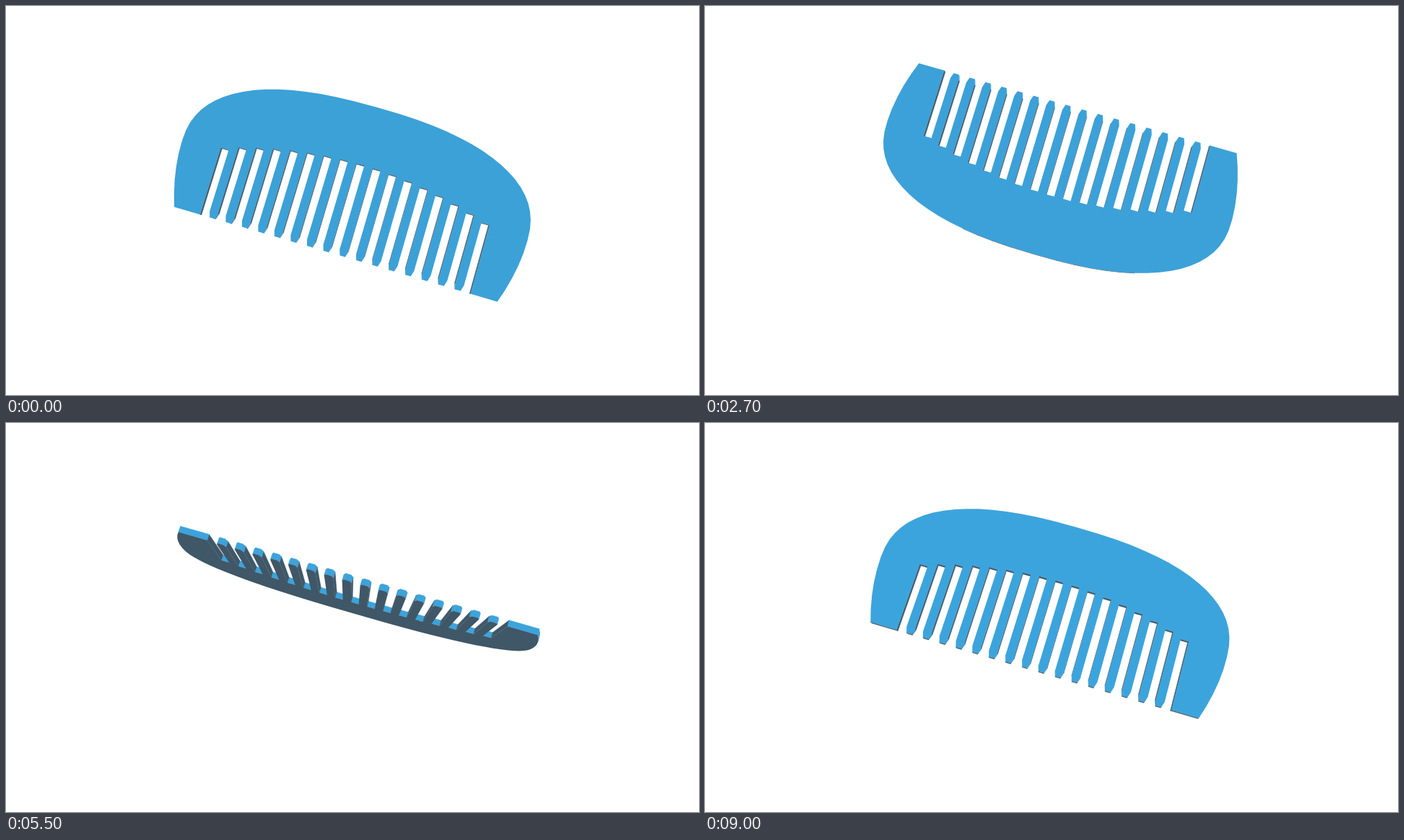
Recreate the animation shown at these times as an HTML page with a canvas. Size 960 px wide and 540 px high, loop 9.1 s.

```html
<!DOCTYPE html>
<html>
<head>
<meta charset="utf-8">
<style>
html, body { margin: 0; width: 100%; height: 100%; overflow: hidden; background: #fff; }
canvas { display: block; }
</style>
</head>
<body>
<canvas id="stage" width="960" height="540"></canvas>
<script>
const ctx = document.getElementById('stage').getContext('2d');
const LOOP = 9100, STEP = 100;
const RAD = Math.PI / 180;

// Steady turn with one quick flip and a small late surge; t in seconds
function spinAt(t) {
  const flip = 66 * Math.tanh(1.076 * (t - 1.81));
  const surge = 10 * Math.exp(-(((t - 7.8) / 0.8) ** 2));
  return (59 + 24.6 * t + flip + surge) * RAD;
}

// Comb in its own plane: x along the spine, y towards the tooth tips
const WIDE = 248, SHOULDER = 15, RISE = 121, ROUND = 2.42, TIP = 106;
const SLOTS = 8, PITCH = 23.4, SLOT = 5.7, HALF = 4;

const spineY = x => SHOULDER - RISE * (1 - Math.abs(x / WIDE) ** ROUND) ** (1 / ROUND);

function makeOutline() {
  const pts = [], flank = [];
  for (let i = 0; i < 5; i++) {
    const p = 1 - i / 5;
    flank.push([WIDE - 17.5 * p ** 1.9, SHOULDER + (TIP - SHOULDER) * p]);
  }
  pts.push(...flank);
  for (let i = 0; i <= 36; i++) {
    const c = Math.cos(i / 36 * Math.PI);
    const x = WIDE * Math.sign(c) * Math.abs(c) ** (2 / ROUND);
    pts.push([x, spineY(x)]);
  }
  pts.push(...flank.reverse().map(([x, y]) => [-x, y]));

  const inner = SLOTS * PITCH + SLOT;
  pts.push([-inner, TIP]);
  for (let k = -SLOTS; k <= SLOTS; k++) {
    const x = k * PITCH, y = 0.486 * k * k - 22.5, tooth = x + PITCH / 2;
    pts.push([x - SLOT, y], [x + SLOT, y]);
    if (k < SLOTS) {
      pts.push([x + SLOT, 98], [tooth - 3.5, TIP], [tooth + 3.5, TIP], [x + PITCH - SLOT, 98]);
    }
  }
  pts.push([inner, TIP]);
  return pts;
}
const outline = makeOutline();
const notch = [119, 113.5].map(x => [x, spineY(x)]);

// n is -1 for a surface facing up, 1 for one facing down
const LIT = [60, 164, 220], DARK = [63, 86, 101];
function shade(n) {
  const p = Math.max(0, (n + 0.25) / 1.25) ** 1.6;
  return `rgb(${LIT.map((c, i) => Math.round(c + (DARK[i] - c) * p))})`;
}

const CAMERA = 950, TILT = 16.15 * RAD, YAW = 2.5 * RAD;
const CENTER = [4.6, -28];

function project([x, y], h, spin) {
  const v = y * Math.cos(spin) + h * Math.sin(spin);
  const w = h * Math.cos(spin) - y * Math.sin(spin);
  const u = x * Math.cos(YAW) - w * Math.sin(YAW);
  const z = x * Math.sin(YAW) + w * Math.cos(YAW);
  const s = CAMERA / (CAMERA - z);
  return [
    480 + s * (CENTER[0] + u * Math.cos(TILT) - v * Math.sin(TILT)),
    270 + s * (CENTER[1] + u * Math.sin(TILT) + v * Math.cos(TILT)),
    z
  ];
}

function area(pts) {
  return pts.reduce((sum, p, i) => {
    const q = pts[(i + 1) % pts.length];
    return sum + p[0] * q[1] - q[0] * p[1];
  }, 0);
}

function fill(pts, color, edge = 0) {
  ctx.beginPath();
  pts.forEach(p => ctx.lineTo(p[0], p[1]));
  ctx.closePath();
  ctx.fillStyle = ctx.strokeStyle = color;
  ctx.fill();
  if (edge) {
    ctx.lineWidth = edge;
    ctx.lineJoin = 'round';
    ctx.stroke();
  }
}

function draw(t) {
  const spin = spinAt(t / 1000);
  const flat = h => outline.map(p => project(p, h, spin));
  const front = flat(HALF), back = flat(-HALF);
  ctx.fillStyle = '#fff';
  ctx.fillRect(0, 0, 960, 540);

  const walls = [];
  outline.forEach(([x, y], i) => {
    const j = (i + 1) % outline.length;
    const pts = [front[i], front[j], back[j], back[i]];
    if (area(pts) <= 0) return;
    const dx = outline[j][0] - x, dy = outline[j][1] - y, len = Math.hypot(dx, dy);
    const n = Math.abs(dy) > 0.99 * len ? 0.98 : dx / len * Math.cos(spin);
    walls.push({ pts, color: shade(n), z: pts.reduce((s, p) => s + p[2], 0) });
  });
  walls.sort((a, b) => a.z - b.z).forEach(w => fill(w.pts, w.color, 0.5));

  const [a, b] = notch;
  const gap = [[a, HALF], [b, HALF], [b, -HALF], [a, -HALF]].map(([p, h]) => project(p, h, spin));
  if (area(gap) > 0) fill(gap, '#fff');

  if (area(front) < 0) fill(front, shade(Math.sin(spin)));
  else if (area(back) > 0) fill(back, shade(-Math.sin(spin)));
}

function tick() {
  draw(Math.floor(performance.now() % LOOP / STEP) * STEP);
  requestAnimationFrame(tick);
}
tick();
</script>
</body>
</html>
```
